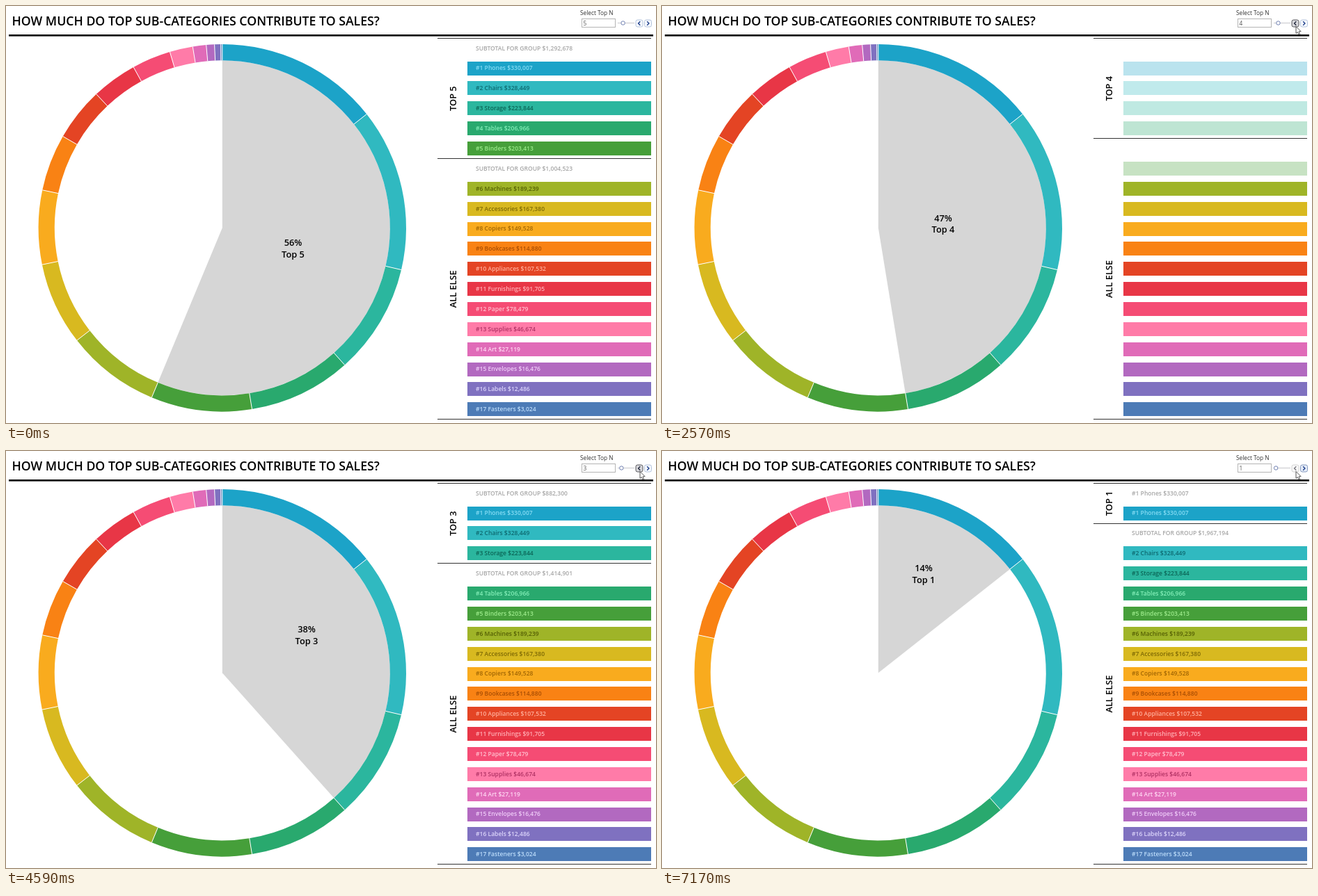
An HTML page with a canvas that plays this animation: 934x600 px, repeating every 8000 ms.

```html
<!DOCTYPE html>
<html lang="en">
<head>
<meta charset="utf-8">
<title>Top sub-categories</title>
<style>
html, body { margin: 0; width: 100%; height: 100%; overflow: hidden; background: #fff; }
canvas { display: block; }
</style>
</head>
<body>
<canvas id="stage" width="934" height="600"></canvas>
<script>
const ctx = document.getElementById('stage').getContext('2d');
const LOOP = 8000;
const FONT = '"Open Sans", "Noto Sans", sans-serif';
const TAU = Math.PI * 2;

// name, sales, fill, text colour
const ITEMS = [
  ['Phones', 330007, '#1ca3c8', '#86dcf4'],
  ['Chairs', 328449, '#30b9c0', '#0d696f'],
  ['Storage', 223844, '#2bb69e', '#0b6455'],
  ['Tables', 206966, '#29a96e', '#84efb9'],
  ['Binders', 203413, '#469f3a', '#9deb8c'],
  ['Machines', 189239, '#9fb428', '#545f04'],
  ['Accessories', 167380, '#d8b920', '#7d6804'],
  ['Copiers', 149528, '#f9ab1e', '#a06604'],
  ['Bookcases', 114880, '#f98214', '#a84e04'],
  ['Appliances', 107532, '#e44424', '#ffb09c'],
  ['Furnishings', 91705, '#e83646', '#ffb0b6'],
  ['Paper', 78479, '#f54c74', '#ffc0cf'],
  ['Supplies', 46674, '#ff7ba8', '#b03264'],
  ['Art', 27119, '#e06bb8', '#ffd8f2'],
  ['Envelopes', 16476, '#b269c0', '#f0cdf8'],
  ['Labels', 12486, '#7f71c0', '#dcd5fa'],
  ['Fasteners', 3024, '#4d7bb6', '#bcdcfa']
];
const TOTAL = 2297201;
const PIE = { x: 310.8, y: 319.3, outer: 264.2, inner: 241 };
const LABEL_AT = { 1: [376, 178], 2: [428.5, 231], 3: [432, 266], 4: [404, 314.5], 5: [412.5, 350] };
const TOP = 46.5, BOTTOM = 595, SLOT = (BOTTOM - TOP) / 19;
const ROW_SIZE = 8.55;

// each change of N: start and end
const CHANGES = [[2480, 2760], [3650, 3990], [5290, 5570], [6830, 7170]];
const BODY_DELAY = 45;
const PRESSED = [[1630, 1680], [1780, 2900], [2950, 4500], [4590, 6040], [6180, 6830]];

const sumTo = n => ITEMS.slice(0, n).reduce((s, item) => s + item[1], 0);
const money = v => '$' + v.toLocaleString('en-US');
const slotY = i => TOP + i * SLOT;

function text(str, x, y, size, color, weight = 600, align = 'left') {
  ctx.font = `${weight} ${size}px ${FONT}`;
  ctx.fillStyle = color;
  ctx.textAlign = align;
  ctx.fillText(str, x, y);
}

function line(x1, y1, x2, y2, color, width = 1) {
  ctx.strokeStyle = color;
  ctx.lineWidth = width;
  ctx.beginPath();
  ctx.moveTo(x1, y1);
  ctx.lineTo(x2, y2);
  ctx.stroke();
}

function stateAt(t) {
  const s = { head: 5, body: 5, alpha: 1, labels: true, moved: 0 };
  for (const [start, end] of CHANGES) {
    if (t < start) break;
    s.head--;
    const from = start + BODY_DELAY;
    if (t < from) break;
    s.body--;
    s.moved = s.body + 1;
    const p = Math.min(1, (t - from) / (end - from));
    s.alpha = 1 - Math.pow(1 - p, 1.65);
    s.labels = t >= end;
  }
  return s;
}

function drawPie(n) {
  const { x, y, outer, inner } = PIE;
  const angle = v => v / TOTAL * TAU - Math.PI / 2;
  ctx.fillStyle = '#d6d6d6';
  ctx.beginPath();
  ctx.moveTo(x, y);
  ctx.arc(x, y, inner, angle(0), angle(sumTo(n)));
  ctx.fill();

  ITEMS.forEach(([, , fill], i) => {
    const a = angle(sumTo(i)), b = angle(sumTo(i + 1));
    ctx.fillStyle = fill;
    ctx.beginPath();
    ctx.arc(x, y, outer, a, b);
    ctx.arc(x, y, inner, b, a, true);
    ctx.fill();
  });
  ITEMS.forEach((item, i) => {
    const a = angle(sumTo(i)), c = Math.cos(a), s = Math.sin(a);
    line(x + inner * c, y + inner * s, x + outer * c, y + outer * s, '#fff');
  });

  const [lx, ly] = LABEL_AT[n];
  text(Math.round(sumTo(n) / TOTAL * 100) + '%', lx, ly - 8.3, 12.8, '#000', 600, 'center');
  text('Top ' + n, lx, ly + 8.3, 12.8, '#000', 600, 'center');
}

function heading(str, y) {
  ctx.save();
  ctx.translate(643.5, y);
  ctx.rotate(-Math.PI / 2);
  text(str, 0, 0, 12.8, '#000', 600, 'center');
  ctx.restore();
}

function rule(x1, x2, y) {
  ctx.fillStyle = '#333';
  ctx.fillRect(x1, Math.floor(y - 0.2), x2 - x1, 1);
}

function drawList(s) {
  const split = slotY(s.head + 1);
  heading('TOP ' + s.head, (TOP + split) / 2);
  heading('ALL ELSE', (split + BOTTOM) / 2);
  rule(620, 927, TOP);
  rule(620, 663, split);
  rule(663, 927, slotY(s.body + 1));
  rule(620, 927, BOTTOM);

  const name = i => `#${i + 1} ${ITEMS[i][0]} ${money(ITEMS[i][1])}`;
  ITEMS.forEach(([, , fill, ink], i) => {
    const mid = slotY(i + (i < s.body ? 1.5 : 2.5));
    ctx.globalAlpha = i < s.moved ? s.alpha : 1;
    ctx.fillStyle = fill;
    ctx.fillRect(663, Math.round(mid - 10.25), 264, 20);
    ctx.globalAlpha = 1;
    if (s.labels) text(name(i), 675, mid + 0.4, ROW_SIZE, ink);
  });

  if (s.labels) {
    const sub = sumTo(s.body) - (s.body > 3 ? 1 : 0);
    const group = v => 'SUBTOTAL FOR GROUP ' + money(v);
    text(s.body > 1 ? group(sub) : name(0), 675, slotY(0.5) + 0.4, ROW_SIZE, '#a6a6a6');
    text(group(TOTAL - sub), 675, slotY(s.body + 1.5) + 0.4, ROW_SIZE, '#a6a6a6');
  }
}

function button(x, dir, edge, fill, ink) {
  ctx.fillStyle = fill;
  ctx.strokeStyle = edge;
  ctx.lineWidth = 1;
  ctx.beginPath();
  ctx.roundRect(x - 5, 20, 10, 10, 2.5);
  ctx.fill();
  ctx.stroke();
  ctx.strokeStyle = ink;
  ctx.lineWidth = 1.4;
  ctx.beginPath();
  ctx.moveTo(x - dir * 1.3, 22.3);
  ctx.lineTo(x + dir * 1.4, 25);
  ctx.lineTo(x - dir * 1.3, 27.7);
  ctx.stroke();
}

function drawControls(n, t) {
  text('Select Top N', 825, 10.5, 8.3, '#333', 400);
  ctx.strokeStyle = '#b4b4b4';
  ctx.lineWidth = 1;
  ctx.strokeRect(827.5, 18.5, 48, 12);
  text(n, 829.5, 25.5, 8.3, '#555', 400);

  line(879, 24.5, 903, 24.5, '#d4d4d8', 1.5);
  ctx.fillStyle = '#fff';
  ctx.strokeStyle = '#6c7db0';
  ctx.lineWidth = 1;
  ctx.beginPath();
  ctx.arc(881 + n * 1.12, 24.5, 2.7, 0, TAU);
  ctx.fill();
  ctx.stroke();

  const down = PRESSED.some(([a, b]) => t >= a && t < b);
  if (n === 1) button(910, -1, '#d2d2d2', '#fafafa', '#77777f');
  else if (down) button(910, -1, '#55555a', '#d8d8dc', '#22283c');
  else button(910, -1, '#b4c4dc', '#f6f9fe', '#1f3f8c');
  button(922.5, 1, n === 1 ? '#8498be' : '#b4c4dc', n === 1 ? '#e6edf8' : '#f6f9fe', '#1f3f8c');
}

function drawCursor(t) {
  if (t < 630) return;
  const p = Math.min(1, (t - 630) / 810);
  const left = Math.pow(1 - p, 2);
  ctx.save();
  ctx.translate(911 + 17 * left, 29.5 + 162 * left);
  ctx.beginPath();
  [[0, 0], [0, 10], [2.3, 8], [4, 11.8], [5.7, 11], [4.1, 7.3], [7.1, 7.1]]
    .forEach(([x, y]) => ctx.lineTo(x, y));
  ctx.closePath();
  ctx.fillStyle = '#fff';
  ctx.fill();
  ctx.strokeStyle = '#444';
  ctx.lineWidth = 0.9;
  ctx.stroke();
  ctx.restore();
}

function draw(t) {
  const s = stateAt(t);
  ctx.fillStyle = '#fff';
  ctx.fillRect(0, 0, 934, 600);
  ctx.textBaseline = 'middle';
  text('HOW MUCH DO TOP SUB-CATEGORIES CONTRIBUTE TO SALES?', 8.5, 23.5, 17.7, '#000');
  ctx.fillStyle = '#000';
  ctx.fillRect(4, 41, 926, 2.6);
  drawPie(s.head);
  drawList(s);
  drawControls(s.head, t);
  drawCursor(t);
}

const began = performance.now();
function tick(now) {
  draw(Math.max(0, now - began) % LOOP);
  requestAnimationFrame(tick);
}
draw(0);
requestAnimationFrame(tick);
</script>
</body>
</html>
```
